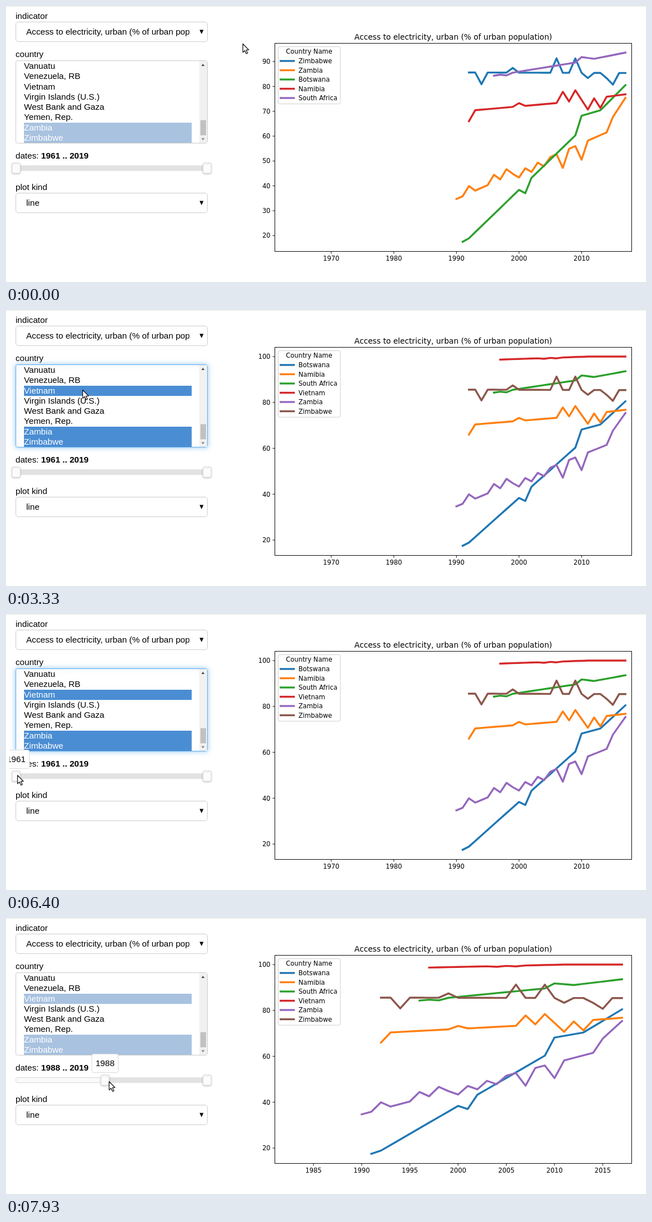
Write an HTML page with a canvas that moves like this. It is 1139 px wide and 492 px high and loops after 8 s.

```html
<!DOCTYPE html>
<html lang="en">
<head>
<meta charset="utf-8">
<title>Indicator explorer</title>
<style>
html, body { margin: 0; width: 100%; height: 100%; overflow: hidden; background: #fff; }
canvas { display: block; }
</style>
</head>
<body>
<canvas id="stage" width="1139" height="492"></canvas>
<script>
const ctx = document.getElementById('stage').getContext('2d');
const LOOP = 8000;
const UI = '15.17px "Liberation Sans", Arial, sans-serif';
const PLOT = '11.38px "DejaVu Sans", sans-serif';
const PLOT_TITLE = '13.65px "DejaVu Sans", sans-serif';
const INDICATOR = 'Access to electricity, urban (% of urban population)';
const COLORS = ['#1f77b4', '#ff7f0e', '#2ca02c', '#d62728', '#9467bd', '#8c564b'];
const COUNTRIES = ['Vanuatu', 'Venezuela, RB', 'Vietnam', 'Virgin Islands (U.S.)',
  'West Bank and Gaza', 'Yemen, Rep.', 'Zambia', 'Zimbabwe'];

// A straight trend through a few points, plus spikes: a size and the years it hits.
function series(trend, ...spikes) {
  const points = [];
  for (let year = trend[0][0]; year <= 2017; year++) {
    const next = Math.max(1, trend.findIndex(([y]) => y >= year));
    const [[y0, v0], [y1, v1]] = [trend[next - 1], trend[next]];
    let value = v0 + (v1 - v0) * (year - y0) / (y1 - y0);
    for (const [size, ...years] of spikes) if (years.includes(year)) value += size;
    points.push([year, value]);
  }
  return points;
}
const DATA = {
  'Zimbabwe': series([[1992, 85.6], [2017, 85.4]],
    [5.8, 2006, 2009], [-4.7, 1994, 2015], [1.9, 1999], [-2.1, 2011, 2014]),
  'Zambia': series([[1990, 34.7], [2006, 52.7], [2014, 61.5], [2015, 67.7], [2017, 75.4]],
    [3, 1992, 1996, 1998], [-2.6, 2000, 2002, 2004], [-6.6, 2007, 2010]),
  'Botswana': series([[1991, 17.5], [1992, 18.9], [2009, 60.3], [2010, 68.2], [2013, 70.4], [2017, 80.5]],
    [-3.8, 2001]),
  'Namibia': series([[1992, 70.2], [2006, 73.3], [2017, 76.8]],
    [4.2, 2007, 2009], [-4.2, 1992, 2011, 2013], [1.3, 2000]),
  'South Africa': series([[1996, 84.3], [2009, 89.6], [2010, 91.8], [2012, 91.1], [2017, 93.6]],
    [-.7, 1998]),
  'Vietnam': series([[1997, 98.7], [2011, 100], [2017, 100]], [-.3, 2004, 2006])
};
const FIVE = ['Zimbabwe', 'Zambia', 'Botswana', 'Namibia', 'South Africa'];
const SIX = ['Botswana', 'Namibia', 'South Africa', 'Vietnam', 'Zambia', 'Zimbabwe'];

// Pointer moves: first step, last step, end x, end y.
const MOVES = [
  [600, 1000, 379, 192], [1200, 1470, 321, 194], [2130, 2670, 136, 142],
  [4870, 4870, 227, 175], [4930, 5130, 562, 407], [5190, 5670, 20, 281],
  [6070, 6200, 20, 287], [6470, 7000, 121, 290], [7330, 7930, 183, 291]
];
const STEP = 66.6;
const DRAG_START = 6470;
const PLOT_DELAY = 430;
const PIXELS_PER_YEAR = 340 / 58;

function pointerAt(t) {
  let x = 421, y = 67;
  for (const [first, last, endX, endY] of MOVES) {
    if (t < first) break;
    const count = Math.round((last - first) / STEP) + 1;
    const p = t >= last ? 1 : (1 + Math.floor((t - first) / (last - first) * (count - 1))) / count;
    x += (endX - x) * p;
    y += (endY - y) * p;
  }
  return { x, y };
}

function firstYearAt(t) {
  return t < DRAG_START ? 1961 : 1961 + Math.floor((pointerAt(t).x - 20) / PIXELS_PER_YEAR);
}

function text(str, x, y, font = UI, color = '#000', align = 'left') {
  ctx.font = font;
  ctx.fillStyle = color;
  ctx.textAlign = align;
  ctx.fillText(str, x, Math.round(y));
}

function rect(x, y, w, h, color) {
  ctx.fillStyle = color;
  ctx.fillRect(x, y, w, h);
}

function box(x, y, w, h, radius, border, fill = '#fff') {
  ctx.beginPath();
  ctx.roundRect(x, y, w, h, radius);
  ctx.fillStyle = fill;
  ctx.fill();
  ctx.strokeStyle = border;
  ctx.lineWidth = 1;
  ctx.stroke();
}

// Triangle with a flat side at y and its tip at y + h.
function triangle(x, y, w, h, color) {
  ctx.beginPath();
  ctx.moveTo(x - w / 2, y);
  ctx.lineTo(x + w / 2, y);
  ctx.lineTo(x, y + h);
  ctx.fillStyle = color;
  ctx.fill();
}

function line(x1, y1, x2, y2) {
  ctx.beginPath();
  ctx.moveTo(x1, y1);
  ctx.lineTo(x2, y2);
  ctx.stroke();
}

function clipped(x, y, w, h, draw) {
  ctx.save();
  ctx.beginPath();
  ctx.rect(x, y, w, h);
  ctx.clip();
  draw();
  ctx.restore();
}

function dropdown(y, value) {
  box(17.5, y, 341, 35, 4.5, '#ccc');
  clipped(30, y, 296.5, 35, () => text(value, 36, y + 22.5));
  triangle(348, y + 14, 7, 7.5, '#000');
}

function countryList(selected, focused) {
  ctx.save();
  if (focused) {
    ctx.shadowColor = 'rgba(102,175,233,.7)';
    ctx.shadowBlur = 8;
  }
  box(17.5, 97.5, 341, 147, 3, focused ? '#66afe9' : '#ccc');
  ctx.restore();
  clipped(18, 98, 340, 146, () => {
    COUNTRIES.forEach((name, i) => {
      const top = 98.6 + 18.25 * i;
      const on = selected.includes(name);
      if (on) rect(32, Math.round(top), 298.5, 18.2, focused ? '#4a8dd3' : '#a8c2e0');
      text(name, 32, top + 13.4, UI, on ? '#fff' : '#000');
    });
    rect(344, 98, 14, 146, '#f1f1f1');
    rect(346, 203.5, 10, 27, '#c1c1c1');
    triangle(350.5, 107, 6, -4, '#505050');
    triangle(350.5, 235.5, 6, 4, '#8b8b8b');
  });
}

function handle(x) {
  ctx.save();
  ctx.shadowColor = 'rgba(0,0,0,.16)';
  ctx.shadowBlur = 3;
  ctx.shadowOffsetY = 1.5;
  box(x - 7.5, 279.5, 15, 18.5, 3, '#d9d9d9', '#fcfcfc');
  ctx.restore();
}

function dateSlider(year, showTip) {
  const x = 18 + (year - 1961) * PIXELS_PER_YEAR;
  text('dates: ', 17, 272);
  text(year + ' .. 2019', 62.6, 272, 'bold ' + UI);
  box(17.5, 284.5, 347, 9, 3, '#d6d6d6', '#fafafa');
  rect(x, 284, 358 - x, 10, '#e2e2e2');
  handle(x);
  handle(358);
  if (showTip) clipped(6, 240, 400, 40, () => {
    box(x - 23.5, 242.5, 47, 33, 3, '#d9d9d9');
    text(year, x, 264, UI, '#000', 'center');
  });
}

function plot(names, firstYear) {
  const left = 478.5, top = 66.5, width = 635, height = 371, bottom = top + height;
  const span = 2018 - firstYear;
  const all = names.flatMap(name => DATA[name].map(([, v]) => v));
  const low = Math.min(...all), range = Math.max(...all) - low;
  const toX = year => left + (year - firstYear) / span * width;
  const toY = v => bottom - .3 - (v - low + range * .05) / (range * 1.1) * height;

  text(INDICATOR, 796, 59.5, PLOT_TITLE, '#000', 'center');

  ctx.lineWidth = 3.4;
  ctx.lineCap = 'square';
  ctx.lineJoin = 'round';
  names.forEach((name, i) => {
    ctx.beginPath();
    DATA[name].forEach(([year, v]) => ctx.lineTo(toX(year), toY(v)));
    ctx.strokeStyle = COLORS[i];
    ctx.stroke();
  });

  ctx.lineCap = 'butt';
  ctx.lineJoin = 'miter';
  ctx.strokeStyle = '#000';
  ctx.lineWidth = .95;
  ctx.strokeRect(left, top, width, height);
  const yearStep = span > 45 ? 10 : 5;
  for (let year = Math.ceil((firstYear + 1) / yearStep) * yearStep; year < 2018; year += yearStep) {
    line(toX(year), bottom, toX(year), bottom + 4);
    text(year, toX(year), 454.4, PLOT, '#000', 'center');
  }
  const valueStep = range > 80 ? 20 : 10;
  for (let v = 20; toY(v) > top; v += valueStep) {
    line(left - 4, toY(v), left, toY(v));
    text(v, 470.6, toY(v) + 4.2, PLOT, '#000', 'right');
  }

  box(484.5, 72.5, 110.5, 19.5 + 16.5 * names.length, 2.5, '#d0d0d0', 'rgba(255,255,255,.8)');
  text('Country Name', 539.5, 85.4, PLOT, '#000', 'center');
  names.forEach((name, i) => {
    const y = 98 + 16.5 * i;
    ctx.strokeStyle = COLORS[i];
    ctx.lineWidth = 3.4;
    line(487, y, 514, y);
    text(name, 520.5, y + 4, PLOT);
  });
}

function pointer({ x, y }) {
  ctx.save();
  ctx.translate(x + .5, y + .5);
  ctx.lineJoin = 'round';
  const outline = new Path2D('M0 0V15L3.5 11.9 6.1 17.6 8.6 16.5 6 11 10.5 10.7Z');
  ctx.fillStyle = '#fff';
  ctx.fill(outline);
  ctx.strokeStyle = '#1c1c1c';
  ctx.lineWidth = 1.3;
  ctx.stroke(outline);
  ctx.restore();
}

function draw(t) {
  const picked = t >= 2930;
  const focused = picked && t < DRAG_START;

  rect(0, 0, 1139, 492, '#fff');
  rect(0, 0, 1139, 1, '#e7e7e7');
  text('indicator', 17, 23);
  dropdown(28.5, INDICATOR);
  text('country', 17, 91);
  countryList(picked ? ['Vietnam', 'Zambia', 'Zimbabwe'] : ['Zambia', 'Zimbabwe'], focused);
  text('plot kind', 17, 328);
  dropdown(333.5, 'line');
  dateSlider(firstYearAt(t), t >= 5730);
  plot(t >= 3330 ? SIX : FIVE, firstYearAt(t - PLOT_DELAY));
  pointer(pointerAt(t));
}

const began = performance.now();
function frame() {
  draw((performance.now() - began) % LOOP);
  requestAnimationFrame(frame);
}
frame();
</script>
</body>
</html>
```
